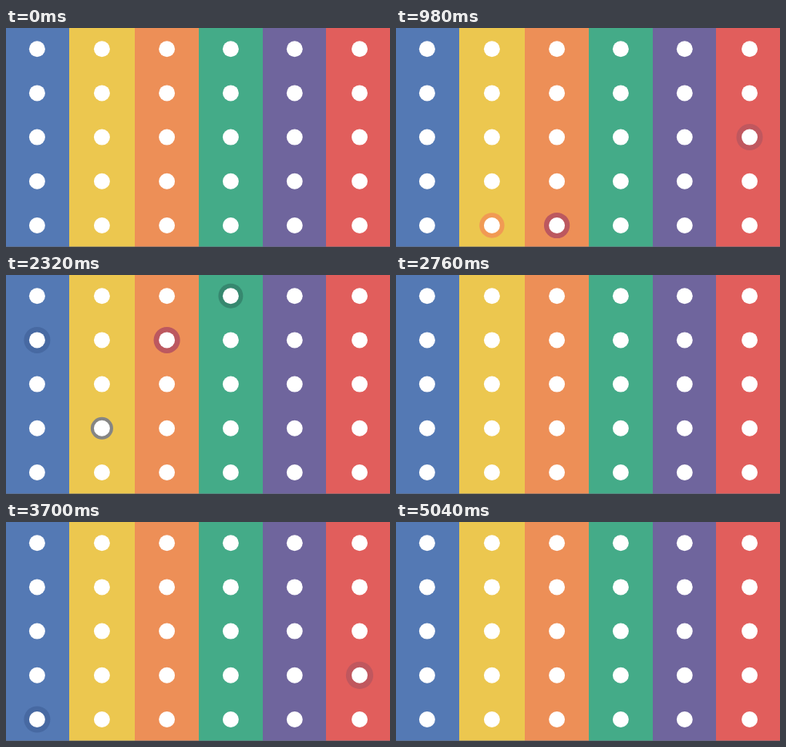
Recreate the animation shown at these times as an HTML page. Size 480 by 274 pixels, loop 5100 ms.

```html
<!DOCTYPE html>
<html lang="en">
<head>
<meta charset="utf-8">
<title>Pulsing dots</title>
<style>
  html, body { margin: 0; width: 100%; height: 100%; overflow: hidden; }
  svg { display: block; width: 100vw; height: 100vh; }
</style>
</head>
<body>
<svg id="stage" viewBox="0 0 480 274" preserveAspectRatio="none"></svg>
<script>
const LOOP = 5100, PULSE = 340, DOT = 10, GROWTH = 7.5, ROWS = 5;
const HOLD_AT = 2290, HOLD_FOR = 230;
const INK = '#3c4663';

// Each column: left edge, dot centre, fill, and the ring colour when young and old.
const columns = [
  { left: 0, x: 38.9, fill: '#5479b4', young: INK, old: '#4769a2' },
  { left: 79, x: 119.9, fill: '#ecc74f', young: '#858584', old: '#f19a54' },
  { left: 161, x: 201.1, fill: '#ed8f57', young: INK, old: '#bc585f' },
  { left: 241, x: 280.9, fill: '#44ab88', young: INK, old: '#36886f' },
  { left: 321, x: 360.8, fill: '#6f659d', young: '#4a4a67', old: '#4c4a69' },
  { left: 400, x: 442, fill: '#e15e5c', young: INK, old: '#c0575e' }
];
const rowY = row => 26.2 + row * 55.2;

const stage = document.getElementById('stage');
function set(node, attrs) {
  for (const key in attrs) node.setAttribute(key, attrs[key]);
}
function add(tag, attrs) {
  const node = document.createElementNS('http://www.w3.org/2000/svg', tag);
  set(node, attrs);
  stage.append(node);
  return node;
}

// Columns overlap to the right, so no seams show.
for (const { left, fill } of columns)
  add('rect', { x: left, y: 0, width: 480 - left, height: 274, fill });
add('rect', { x: 0, y: 273, width: 480, height: 1, fill: '#666a78', opacity: 0.5 });

// Starts rings on dots named by column letter and row; "+" joins simultaneous ones.
const rings = [];
function phrase(start, dots, gap = 0, ratio = 1) {
  for (const chord of dots.split(' ')) {
    for (const name of chord.split('+')) {
      const column = columns['ABCDEF'.indexOf(name[0])];
      const node = add('circle', { cx: column.x, cy: rowY(name[1] - 1) });
      rings.push({ column, start, node });
    }
    start += gap;
    gap *= ratio;
  }
}
phrase(764, 'F3 C5 B5', 23);
phrase(2074, 'A2+C2 D1 B4', 54);
phrase(2618, 'D5 E3 B1+E4 F1 A3+D3', 107, 0.65);
phrase(3210, 'F4 A5', 44);
phrase(3833, 'D4');
phrase(4470, 'C4');

for (const { x } of columns)
  for (let row = 0; row < ROWS; row++)
    add('circle', { cx: x, cy: rowY(row), r: DOT, fill: '#fff' });

// A ring grows with an ease-out, changes tone, and ends as a dashed outline.
function drawRing({ column, start, node }, time) {
  const p = (time - start) / PULSE;
  const visible = p > 0 && p < 0.9;
  node.style.display = visible ? '' : 'none';
  if (!visible) return;
  const outline = p > 0.78;
  set(node, {
    r: DOT + GROWTH * (1 - (1 - p) ** 2),
    fill: outline ? 'none' : p < 0.4 ? column.young : column.old,
    stroke: outline ? column.old : 'none',
    'stroke-dasharray': '2 2'
  });
}

// The rings stand still for a moment in mid-loop.
function draw(t) {
  const held = Math.max(0, Math.min(HOLD_FOR, t - HOLD_AT));
  for (const ring of rings) drawRing(ring, t - held);
}

const origin = performance.now();
function tick() {
  draw((performance.now() - origin) % LOOP);
  requestAnimationFrame(tick);
}
tick();
</script>
</body>
</html>
```
